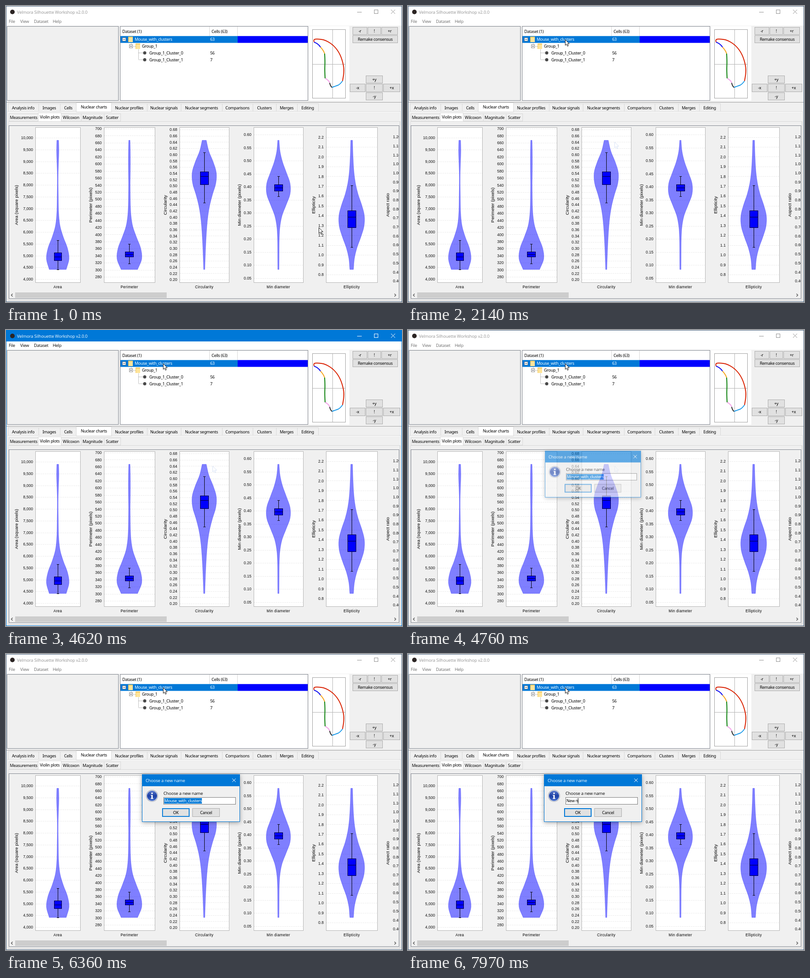
An HTML page with a canvas for the animation above (8000 ms loop, 865 by 647 pixels).

```html
<!DOCTYPE html>
<html lang="en">
<head>
<meta charset="utf-8">
<title>Violin plots</title>
<style>
html, body { margin: 0; width: 100%; height: 100%; overflow: hidden; background: #f0f0f0; }
canvas { display: block; width: 865px; height: 647px; }
</style>
</head>
<body>
<canvas id="stage" width="865" height="647"></canvas>
<script>
const stage = document.getElementById('stage').getContext('2d');
const layer = stage.canvas.cloneNode().getContext('2d');
let ctx = stage;
const LOOP = 8000, STEP = 70;
const BLUE = '#0078d7', GREY = '#f0f0f0';

// font, letter spacing
const UI = ['9px "Noto Sans", sans-serif', '-0.3px'];
const TITLE = ['9.3px "Open Sans", sans-serif', '-0.08px'];
const MENU = ['9.3px "Open Sans", sans-serif', '-0.25px'];
const TICK = ['8.6px "Liberation Sans", Arial, sans-serif', '0px'];
const CATEGORY = ['8.2px "Liberation Sans", Arial, sans-serif', '0.35px'];
const AXIS = ['9.8px "Liberation Sans", Arial, sans-serif', '0px'];

const clamp = v => Math.max(0, Math.min(1, v));
const mix = (a, b, k) => a + (b - a) * k;
const smooth = k => k * k * (3 - 2 * k);
// progress in equal jumps of STEP, the first one landing at `start`
const steps = (t, start, n) => clamp((Math.floor((t - start) / STEP) + 1) / n);

function text(s, x, y, style, color = '#000', align = 'left') {
  ctx.font = style[0];
  ctx.letterSpacing = style[1];
  ctx.fillStyle = color;
  ctx.textAlign = align;
  ctx.fillText(s, x, y);
}

function rect(x, y, w, h, fill) {
  ctx.fillStyle = fill;
  ctx.fillRect(x, y, w, h);
}

function frame(x, y, w, h, fill, line) {
  rect(x, y, w, h, line);
  rect(x + 1, y + 1, w - 2, h - 2, fill);
}

function line(points, color, width = 1, dash = []) {
  ctx.beginPath();
  points.forEach(([x, y]) => ctx.lineTo(x, y));
  ctx.strokeStyle = color;
  ctx.lineWidth = width;
  ctx.setLineDash(dash);
  ctx.stroke();
  ctx.setLineDash([]);
}

function disc(x, y, r, fill) {
  ctx.beginPath();
  ctx.arc(x, y, r, 0, Math.PI * 2);
  ctx.fillStyle = fill;
  ctx.fill();
}

function button(s, x, y, w, h) {
  frame(x, y, w, h, '#e1e1e1', '#adadad');
  text(s, x + w / 2, y + h / 2 + 3, UI, '#000', 'center');
}

function cross(x, y, r, color) {
  line([[x - r, y - r], [x + r, y + r]], color);
  line([[x - r, y + r], [x + r, y - r]], color);
}

function titleBar(active) {
  const ink = active ? '#fff' : '#929292';
  rect(0, 0, 865, 25, active ? BLUE : '#fff');
  rect(0, 25, 865, 18, '#fff');
  disc(14, 13, 5, '#2b2423');
  text('Velmora Silhouette Workshop v2.0.0', 24, 17, TITLE, ink);
  line([[767, 13.5], [777, 13.5]], ink);
  ctx.strokeStyle = ink;
  ctx.strokeRect(804.5, 8.5, 8, 8);
  cross(845.5, 12.5, 4.5, ink);
  const menuInk = active ? '#000' : '#6d6d6d';
  [['File', 6], ['View', 31], ['Dataset', 61], ['Help', 102]]
    .forEach(([s, x]) => text(s, x, 37, MENU, menuInk));
}

function expander(x, y) {
  frame(x - 4, y - 4, 8, 8, '#fff', '#8c8c8c');
  rect(x - 2, y - 0.5, 4, 1, '#223');
}

function folder(x, y) {
  rect(x - 5, y - 6, 10, 12, '#f3c95f');
  rect(x - 4, y - 4, 9, 10, '#ffe49a');
}

function tree() {
  frame(2, 44, 244, 163, GREY, '#828790');
  frame(249, 44, 411, 163, '#fff', '#828790');
  rect(444, 45, 1, 21, '#d8d8d8');
  rect(505, 45, 1, 21, '#d8d8d8');
  text('Dataset (1)', 254, 59, UI);
  text('Cells (63)', 449, 59, UI);
  rect(250, 65.7, 256, 14.9, BLUE);
  rect(506, 65.7, 153, 14.9, '#00f');
  const dots = [1, 1];
  line([[273.5, 81], [273.5, 84]], '#999', 1, dots);
  line([[278, 88.5], [283, 88.5]], '#999', 1, dots);
  line([[289.5, 95], [289.5, 117.5], [300, 117.5]], '#888', 1, dots);
  line([[290, 102.5], [300, 102.5]], '#888', 1, dots);
  expander(258, 73);
  expander(273, 88);
  folder(272, 73);
  folder(288, 88);
  disc(303, 102.5, 3.5, '#484848');
  disc(303, 117.5, 3.5, '#484848');
  text('Mouse_with_clusters', 281, 76, UI, '#fff');
  text('63', 446, 76, UI, '#fff');
  text('Group_1', 297, 91, UI);
  text('Group_1_Cluster_0', 313, 106, UI);
  text('56', 446, 106, UI);
  text('Group_1_Cluster_1', 313, 120.5, UI);
  text('7', 446, 120.5, UI);
}

function curve(color, pts) {
  ctx.beginPath();
  ctx.moveTo(...pts[0]);
  for (let i = 1; i < pts.length - 1; i++) {
    const [x, y] = pts[i], [nx, ny] = pts[i + 1];
    const last = i === pts.length - 2;
    ctx.quadraticCurveTo(x, y, last ? nx : (x + nx) / 2, last ? ny : (y + ny) / 2);
  }
  ctx.strokeStyle = color;
  ctx.lineWidth = 2;
  ctx.stroke();
}

function consensus() {
  rect(661, 44, 89, 163, '#fff');
  frame(669, 51, 73, 151, '#fff', '#a0a0a0');
  rect(713, 52, 1, 149, '#b4b4b4');
  rect(670, 127, 71, 1, '#b4b4b4');
  curve('#d92100', [[673, 79], [671, 73], [680, 72], [697, 74], [716, 86], [730, 105], [738, 131], [738, 150], [735, 164]]);
  curve('#1e9be9', [[735, 164], [729, 172], [720, 175], [712, 178]]);
  curve('#333', [[712, 178], [708, 174], [707, 168]]);
  curve('#f4a5ea', [[707, 168], [705, 162], [697, 158]]);
  curve('#087f08', [[697, 158], [696, 140], [697, 120], [696, 104]]);
  curve('#f5a623', [[696, 104], [693, 96], [687, 90]]);
  curve('#1010f0', [[687, 90], [682, 82], [673, 79]]);
  button('-r', 757, 46, 32, 17);
  button('!', 790, 46, 29, 17);
  button('+r', 820, 46, 36, 17);
  button('Remake consensus', 757, 64, 99, 17);
  button('+y', 786, 152, 37, 17);
  button('-x', 751, 170, 34, 18);
  button('!', 786, 170, 37, 18);
  button('+x', 824, 170, 37, 18);
  button('-y', 786, 189, 37, 17);
}

// edges[i]..edges[i + 1] bounds each tab
function tabs(names, edges, top, h, chosen) {
  names.forEach((s, i) => {
    const x = edges[i], w = edges[i + 1] - x, on = i === chosen;
    if (on) frame(x - 1, top - 2, w + 2, h + 3, '#fff', '#d9d9d9');
    else frame(x, top, w + 1, h, GREY, '#d9d9d9');
    text(s, x + w / 2, top + h / 2 + (on ? 2 : 3.5), UI, '#000', 'center');
  });
}

function tabBars() {
  rect(0, 210, 865, 1, '#a0a0a0');
  frame(3, 230, 859, 414, '#fff', '#d9d9d9');
  rect(5, 232, 855, 410, GREY);
  tabs(['Analysis info', 'Images', 'Cells', 'Nuclear charts', 'Nuclear profiles', 'Nuclear signals',
    'Nuclear segments', 'Comparisons', 'Clusters', 'Merges', 'Editing'],
    [4, 71, 118, 154, 230, 308, 382, 472, 539, 590, 636, 682], 213, 18, 3);
  frame(5, 252, 856, 391, GREY, '#d9d9d9');
  tabs(['Measurements', 'Violin plots', 'Wilcoxon', 'Magnitude', 'Scatter'],
    [6, 71, 120, 164, 214, 250], 235, 17, 1);
}

// ticks: [first value, step, count, decimals, first y, last y]
// box: [half width, top, bottom, median, whisker top, whisker bottom]
// widths: half widths of the violin at even heights
const charts = [
  { name: 'Area', label: 'Area (square pixels)', axis: 26, x: 64, w: 99, mid: 113,
    ticks: [10000, -500, 13, 0, 288, 597], box: [8.5, 539, 557, 548, 512, 576],
    widths: [2, 2.5, 1.8, 1, 0.9, 1.2, 1.5, 2.4, 5.3, 12.3, 21.2, 24.7, 18.5] },
  { name: 'Perimeter', label: 'Perimeter (pixels)', axis: 188, x: 214, w: 112, mid: 269.5,
    ticks: [700, -20, 22, 0, 268, 592], box: [9.5, 537, 549, 543, 520, 563],
    widths: [1.5, 2, 2.2, 2, 1.7, 1.9, 2.3, 3.6, 7.4, 15.6, 24.6, 27, 18] },
  { name: 'Circularity', label: 'Circularity', axis: 351, x: 379, w: 109, mid: 433,
    ticks: [0.68, -0.02, 25, 2, 270, 598], box: [9.5, 362, 391, 372, 320, 430],
    widths: [4.5, 10, 19.5, 26.4, 25.3, 18.3, 12.2, 8.2, 5.8, 4.2, 3, 2.1, 1.3] },
  { name: 'Min diameter', label: 'Min diameter (pixels)', axis: 513, x: 541, w: 109, mid: 595,
    ticks: [0.6, -0.05, 12, 2, 281, 594.5], box: [9.5, 390, 405, 397, 372, 416],
    widths: [1.5, 3.5, 9, 17.5, 25.5, 25.5, 17, 8, 3.5, 2, 1.6, 1.5, 1.3] },
  { name: 'Ellipticity', label: 'Ellipticity', axis: 675, x: 699, w: 113, mid: 755,
    ticks: [2.2, -0.1, 15, 1, 286.5, 587], box: [9.5, 447, 485, 461, 392, 527],
    widths: [2, 2.6, 3.6, 5.2, 8.4, 14, 22, 27.8, 27, 20, 11.5, 6, 4] },
  { name: '', label: 'Aspect ratio', axis: 837, x: 867, w: 110, mid: 922,
    ticks: [1.2, -0.05, 17, 2, 286, 601] }
];

function violin(mid, widths) {
  const top = 293.5, gap = 282.5 / (widths.length - 1), last = widths.length - 1;
  const slope = i => (widths[Math.min(last, i + 1)] - widths[Math.max(0, i - 1)]) / (i % last ? 6 : 3);
  ctx.beginPath();
  ctx.moveTo(mid + widths[0], top);
  for (let i = 0; i < last; i++) {
    const y = top + i * gap;
    ctx.bezierCurveTo(mid + widths[i] + slope(i), y + gap / 3,
      mid + widths[i + 1] - slope(i + 1), y + gap * 2 / 3, mid + widths[i + 1], y + gap);
  }
  ctx.lineTo(mid - widths[last], top + last * gap);
  for (let i = last; i > 0; i--) {
    const y = top + i * gap;
    ctx.bezierCurveTo(mid - widths[i] + slope(i), y - gap / 3,
      mid - widths[i - 1] - slope(i - 1), y - gap * 2 / 3, mid - widths[i - 1], y - gap);
  }
  ctx.closePath();
  ctx.fillStyle = 'rgba(0,0,255,0.5)';
  ctx.fill();
  ctx.strokeStyle = 'rgba(0,0,255,0.35)';
  ctx.lineWidth = 0.8;
  ctx.stroke();
}

function boxPlot(mid, [half, top, bottom, median, high, low]) {
  const x = Math.floor(mid) + 0.5;
  line([[x, high], [x, low]], '#000');
  [high, low].forEach(y => line([[x - 2.5, y + 0.5], [x + 2.5, y + 0.5]], '#000'));
  rect(x - half, top, half * 2, bottom - top, '#00f');
  ctx.strokeStyle = '#000033';
  ctx.lineWidth = 1;
  ctx.strokeRect(x - half + 0.5, top + 0.5, half * 2 - 1, bottom - top - 1);
  line([[x - half, median + 0.5], [x + half, median + 0.5]], '#000033');
}

function chart({ name, label, axis, x, w, mid, ticks, box, widths }) {
  const [first, step, count, digits, y0, y1] = ticks;
  frame(x, 265, w, 340, '#fff', '#b5b5b5');
  for (let i = 0; i < count; i++) {
    const y = mix(y0, y1, i / (count - 1));
    const value = (first + step * i).toLocaleString('en-US',
      { minimumFractionDigits: digits, maximumFractionDigits: digits });
    line([[x + 1, Math.round(y) + 0.5], [x + w - 1, Math.round(y) + 0.5]], '#e4e4e4', 1, [2, 2]);
    text(value, x - 5, y + 3.2, TICK, '#111', 'right');
  }
  if (widths) {
    violin(mid, widths);
    boxPlot(mid, box);
  }
  text(name, mid, 617, CATEGORY, '#000', 'center');
  ctx.save();
  ctx.translate(axis, 435);
  ctx.rotate(-Math.PI / 2);
  text(label, 0, 0, AXIS, '#000', 'center');
  ctx.restore();
}

function chartPanel() {
  frame(6, 261, 853, 379, GREY, '#828790');
  ctx.save();
  ctx.beginPath();
  ctx.rect(7, 262, 851, 362);
  ctx.clip();
  charts.forEach(chart);
  ctx.restore();
  rect(20, 626, 331, 12, '#cdcdcd');
  line([[14.5, 629], [11.5, 632], [14.5, 635]], '#505050', 1.3);
  line([[848.5, 629], [851.5, 632], [848.5, 635]], '#505050', 1.3);
}

function arrow(x, y, fill, edge) {
  ctx.beginPath();
  [[0.5, 0.5], [0.5, 13], [3.3, 10.4], [5.3, 15], [7.4, 14], [5.4, 9.7], [9.3, 9.5]]
    .forEach(([dx, dy]) => ctx.lineTo(x + dx, y + dy));
  ctx.closePath();
  ctx.fillStyle = fill;
  ctx.fill();
  ctx.strokeStyle = edge;
  ctx.lineWidth = 0.9;
  ctx.stroke();
}

const sweep = t => smooth(steps(t, 470, 12));

function pointer(t) {
  if (t < 470) {
    const k = steps(t, 70, 3);
    return [mix(683, 505, k), mix(484, 349, k)];
  }
  if (t < 1310) {
    const k = sweep(t), a = (1 - k) * (1 - k), b = 2 * k * (1 - k), c = k * k;
    return [a * 505 + b * 415 + c * 350, a * 349 + b * 280 + c * 103];
  }
  const k = smooth(steps(t, 1310, 5));
  return [mix(350, 343, k), t < 2140 ? mix(103, 75, k) : 73];
}

function infoIcon(x, y) {
  const g = ctx.createLinearGradient(0, y - 12, 0, y + 12);
  g.addColorStop(0, '#5f7fd0');
  g.addColorStop(0.5, '#1c3fa4');
  g.addColorStop(1, '#4570d0');
  disc(x, y, 13, '#8d95a5');
  disc(x, y, 12.2, '#e2e6ee');
  disc(x, y, 11, g);
  disc(x, y - 5.5, 1.8, '#fff');
  rect(x - 1.5, y - 2, 3, 8, '#fff');
  rect(x - 3, y - 2, 3, 1.3, '#fff');
  rect(x - 3, y + 5.5, 6, 1.3, '#fff');
}

function nameField(t) {
  frame(344, 313, 158, 16, '#fff', '#7a7a7a');
  const keys = [6640, 7130, 7340, 7620, 7970];
  const typed = t >= keys[0];
  const value = typed ? 'New n'.slice(0, keys.filter(k => t >= k).length) : 'Mouse_with_clusters';
  ctx.font = UI[0];
  ctx.letterSpacing = UI[1];
  const w = ctx.measureText(value).width;
  if (!typed) rect(345.5, 315, w + 0.5, 12, BLUE);
  text(value, 346, 324, UI, typed ? '#000' : '#fff');
  const blink = t >= 5590 && Math.floor((t - 5590) / 500) % 2 === 0;
  if (typed || blink) rect(Math.round(346 + w), 315, 1, 12, '#000');
}

function dialogBody(t) {
  ctx.shadowColor = 'rgba(0,0,0,0.35)';
  ctx.shadowBlur = 9;
  ctx.shadowOffsetY = 2;
  rect(297, 263, 214, 104, BLUE);
  ctx.shadowColor = 'transparent';
  rect(298, 289, 212, 77, GREY);
  text('Choose a new name', 305, 280, TITLE, '#fff');
  cross(498, 276, 3.8, '#fff');
  infoIcon(319, 310);
  text('Choose a new name', 344, 307.5, TITLE);
  nameField(t);
  button('OK', 341, 337, 60, 19);
  button('Cancel', 407, 337, 60, 19);
  const pulse = 0.5 - 0.5 * Math.cos((Math.floor(t / STEP) * STEP - 4970) / 1000 * Math.PI);
  ctx.strokeStyle = BLUE;
  ctx.lineWidth = 1;
  ctx.strokeRect(341.5, 337.5, 59, 18);
  ctx.globalAlpha = mix(0.45, 1, pulse);
  ctx.strokeRect(342.5, 338.5, 57, 16);
  ctx.globalAlpha = 1;
}

// the dialog is painted on its own layer so that it fades as one piece
function dialog(t) {
  ctx = layer;
  ctx.clearRect(0, 0, 865, 647);
  dialogBody(t);
  ctx = stage;
  const fade = 1 - Math.pow(1 - steps(t, 4690, 5), 1.9), size = mix(0.95, 1, fade);
  ctx.save();
  ctx.globalAlpha = fade;
  ctx.translate(404, 315);
  ctx.scale(size, size);
  ctx.drawImage(layer.canvas, -404, -315);
  ctx.restore();
}

function draw(t) {
  const active = t >= 4410 && t < 4690;
  rect(0, 0, 865, 647, GREY);
  titleBar(active);
  tree();
  consensus();
  tabBars();
  chartPanel();
  ctx.strokeStyle = active ? BLUE : '#4d6985';
  ctx.lineWidth = 1;
  ctx.strokeRect(0.5, 0.5, 864, 646);
  if (sweep(t) > 0.3) arrow(451, 297, 'rgba(255,255,255,0.25)', 'rgba(160,185,230,0.45)');
  if (t >= 4690) dialog(t);
  const [x, y] = pointer(t);
  if (t >= 4410 && t < 4620) disc(344.5, 73.5, 9, 'rgba(238,224,45,0.78)');
  arrow(x, y, '#fff', '#000');
}

function tick(now) {
  draw(now % LOOP);
  requestAnimationFrame(tick);
}
requestAnimationFrame(tick);
</script>
</body>
</html>
```
